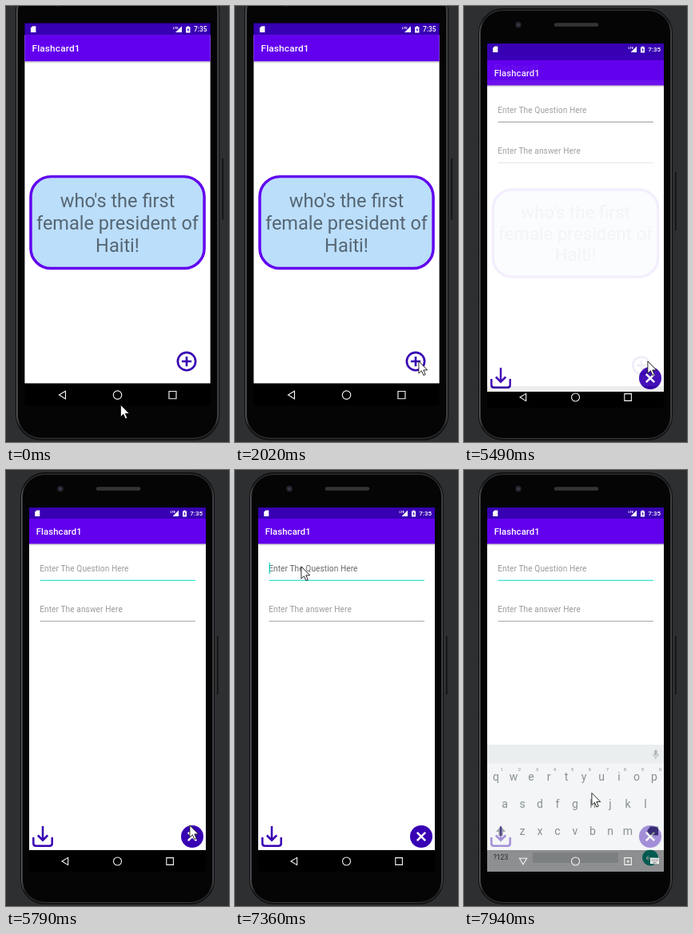
Recreate the animation shown at these times as an HTML page. Size 279 px wide and 546 px high, loop 8000 ms.

```html
<!DOCTYPE html>
<html lang="en">
<head>
<meta charset="utf-8">
<title>Flashcard app</title>
<style>
html, body { margin: 0; width: 100%; height: 100%; overflow: hidden; background: #2d2f31; }
svg { display: block; width: 279px; height: 546px; font-family: Roboto, sans-serif; }
.line { fill: none; stroke: #3700b3; stroke-width: 2.5; }
.title { font-size: 11.25px; font-weight: 500; letter-spacing: .14px; fill: #fff; }
.hint { font-size: 10.12px; letter-spacing: .095px; fill: #9a9a9a; }
.card { font-size: 22.4px; fill: #566673; text-anchor: middle; }
.nav { fill: none; stroke: #f4f4f4; stroke-width: 1.1; }
</style>
</head>
<body>
<svg viewBox="0 0 279 546">
  <defs>
    <linearGradient id="rim">
      <stop offset="0" stop-color="#6a6d70"/><stop offset=".02" stop-color="#1b1c1d"/>
      <stop offset=".98" stop-color="#1b1c1d"/><stop offset="1" stop-color="#54575a"/>
    </linearGradient>
    <linearGradient id="shade" x2="0" y2="1">
      <stop stop-color="#000" stop-opacity=".25"/><stop offset="1" stop-color="#000" stop-opacity="0"/>
    </linearGradient>
    <g id="bars">
      <path d="M29 61H250V476H29Z" fill="#fff"/>
      <path d="M29 47H250V61.5H29Z" fill="#3700b3"/>
      <path d="M29 61H250V92.5H29Z" fill="#6200ee"/>
      <path d="M29 92.5H250V95H29Z" fill="url(#shade)"/>
      <text class="title" x="37.7" y="80.8">Flashcard1</text>
    </g>
  </defs>

  <g id="phone">
    <path d="M264.8 208V281" stroke="#111213" stroke-width="1.6"/>
    <rect x="18.5" y="3.5" width="242" height="540" rx="30" fill="url(#rim)" stroke="#0b0b0c"/>
    <rect x="20.5" y="5.5" width="238" height="536" rx="28" fill="#050505" stroke="#3a3c3e" stroke-width=".8"/>
    <circle cx="68" cy="23.5" r="3.8" fill="#24242e"/>
    <circle cx="68" cy="23.5" r="1.6" fill="#3b3b52"/>
    <path d="M115 23.5H166" stroke="#343434" stroke-width="4.5" stroke-linecap="round" stroke-dasharray="3 1"/>
    <path d="M29 47H250V503H29Z" fill="#000"/>

    <use href="#bars"/>
    <rect x="36.2" y="229.8" width="206.6" height="109.4" rx="24" fill="#bbdefb" stroke="#6200ee" stroke-width="3.3"/>
    <g class="card">
      <text x="139.5" y="266.3">who's the first</text>
      <text x="139.5" y="293">female president of</text>
      <text x="139.5" y="319.4">Haiti!</text>
    </g>
    <g class="line"><circle cx="221.8" cy="450" r="10.6"/><path d="M216 450H227.6M221.8 444.2V455.8"/></g>

    <g id="form">
      <use href="#bars"/>
      <text class="hint" id="question" x="42.2" y="127">Enter The Question Here</text>
      <text class="hint" x="42.2" y="178">Enter The answer Here</text>
      <path id="under1" d="M42.5 138.3H237" stroke-width="1.1"/>
      <path id="under2" d="M42.5 189.3H237" stroke-width=".8"/>
      <path id="caret" d="M43.2 116V130" stroke="#03dac5" stroke-width="1.2"/>
      <path class="line" d="M34.3 460V467.5Q34.3 470.8 37.5 470.8H54.5Q57.7 470.8 57.7 467.5V460M46 446V463.5M39.8 457.5L46 463.7L52.2 457.5"/>
      <circle cx="233" cy="459" r="14" fill="#3700b3"/>
      <path d="M227.8 453.8L238.2 464.2M238.2 453.8L227.8 464.2" stroke="#fff" stroke-width="2.5"/>
    </g>

    <g fill="#fff">
      <path d="M38.3 50.5H42.3V58H36.2V52.6Z"/>
      <text x="205.5" y="53.8" font-size="4" font-weight="700">LTE</text>
      <path d="M208.5 58L216 50.5V58Z"/>
      <path d="M221 51.5H222.5V50.5H224.5V51.5H226V58.5H221Z"/>
      <path d="M224 52.3L222.2 55.3H223.4V57.6L225 54.6H223.8Z" fill="#3700b3"/>
      <text x="246" y="57.4" font-size="8" font-weight="500" text-anchor="end">7:35</text>
    </g>

    <g id="keys">
      <path d="M29 344H250V503H29Z" fill="#eceff1"/>
      <path d="M29 344H250V367.5H29Z" fill="#dfe4e6"/>
      <g fill="#7b868c"><rect x="238" y="350.5" width="3.6" height="7" rx="1.8"/>
        <path d="M236.4 355.5Q236.6 359.3 239.8 359.3T243.2 355.5M239.8 359.3V362" fill="none" stroke="#7b868c"/></g>
      <g id="letters" fill="#37474f" text-anchor="middle"></g>
      <path d="M46 446L52 453H48.7V458H43.3V453H40Z" fill="#5d6b72"/>
      <path d="M229 452L233 446.5H243V457.5H233Z" fill="#37474f"/>
      <rect x="86" y="479" width="107" height="13" rx="1.5" fill="#cfd5d8"/>
      <circle cx="233" cy="485.5" r="10" fill="#009688"/>
      <path d="M228 486H238M231 483L228 486L231 489" fill="none" stroke="#fff"/>
    </g>

    <g class="nav">
      <path id="back" d="M70 490L77.6 485.4V494.6Z"/>
      <circle cx="139.5" cy="490" r="5"/>
      <path d="M200.8 485.6H209.4V494.4H200.8Z"/>
      <g id="kbIcon"><rect x="233" y="485.8" width="11" height="7.4" fill="#f4f4f4" stroke="none"/>
        <path d="M234.3 487.7H243M234.3 489.5H243" stroke="#555" stroke-width=".9" stroke-dasharray="1.1 .8"/>
        <path d="M236 491.7H241" stroke="#555" stroke-width=".8"/></g>
    </g>
    <path id="dot" d="M204 489H206.4V491.4H204Z" fill="#f4f4f4"/>
  </g>

  <path id="mouse" d="M.4 .4V15.6L3.9 12.3L6.4 18L8.8 17L6.3 11.4H11.2Z" fill="#fff" stroke="#111" stroke-width=".9"/>
</svg>
<script>
const LOOP = 8000;
const $ = id => document.getElementById(id);
const set = (id, attrs) => { for (const k in attrs) $(id).setAttribute(k, attrs[k]); };
const show = (id, on) => set(id, { visibility: on ? 'visible' : 'hidden' });

// pointer: time, x, y (moves in jumps)
const moves = [
  [0, 143, 499], [440, 142, 484], [590, 161, 416], [1020, 174, 421], [1180, 208, 432],
  [1480, 216, 436], [1610, 223, 439], [1750, 225, 441], [1880, 227, 442], [2020, 229.5, 444.5],
  [5940, 222, 428], [6070, 207, 391], [6220, 143, 287], [6500, 93, 144], [6650, 93, 135],
  [6930, 91, 131], [7080, 82.5, 120.5], [7810, 128, 280], [7940, 159.5, 404]
];

const glyph = (c, x, y, size) => `<text x="${x}" y="${y}" font-size="${size}">${c}</text>`;
let letters = glyph('?123', 46, 488.3, 8.5);
[['qwertyuiop', 40], ['asdfghjkl', 51], ['zxcvbnm', 73]].forEach(([row, x], r) => {
  [...row].forEach((c, i) => {
    letters += glyph(c, x + i * 22, 388.5 + r * 34, 14);
    if (!r) letters += glyph((i + 1) % 10, x + 7.5 + i * 22, 377.3, 6);
  });
});
$('letters').innerHTML = letters;

function draw(t) {
  const [, x, y] = moves.filter(m => m[0] <= t).pop();
  set('mouse', { transform: `translate(${x} ${y})` });
  set('phone', { transform: t < 4300 ? 'translate(-7.1 -27.9) scale(1.051)' : '' });

  const entering = t < 5640;
  show('form', t >= 5490);
  set('form', {
    opacity: entering ? .93 : 1,
    transform: `translate(0 ${entering ? 7 : t < 5790 ? 1 : 0})`
  });
  set('under1', { stroke: entering ? '#8c8c8c' : '#03dac5' });
  set('under2', { stroke: entering ? '#dcdcdc' : '#8c8c8c' });
  set('question', { style: t >= 7360 && t < 7510 ? 'fill:#666' : '' });
  set('caret', { opacity: t >= 6070 && t < 6500 || t >= 7080 && t < 7510 ? 1 : 0 });

  const typing = t >= 7660;
  set('back', { d: typing ? 'M69.4 486.2H78.6L74 494Z' : 'M70 490L77.6 485.4V494.6Z' });
  show('kbIcon', typing);
  show('dot', typing);
  show('keys', t >= 7810);
  set('keys', {
    opacity: t < 7940 ? .3 : .6
  });
}

const start = performance.now();
function tick() {
  draw((performance.now() - start) % LOOP);
  requestAnimationFrame(tick);
}
tick();
</script>
</body>
</html>
```
